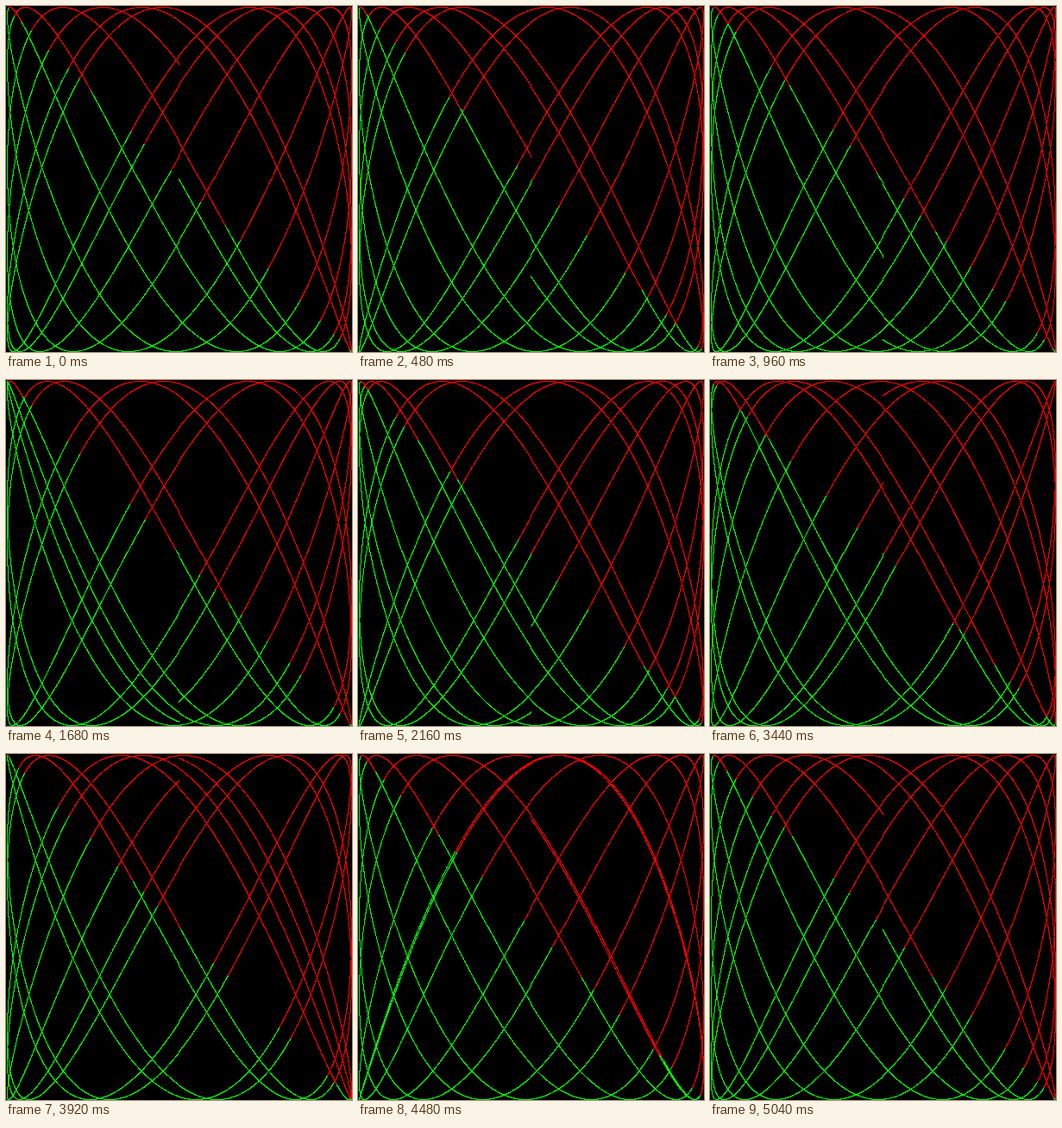
Recreate the animation shown at these times as an HTML page with a canvas. Size 401 px wide and 401 px high, loop 5120 ms.

```html
<!DOCTYPE html>
<html lang="en">
<head>
<meta charset="utf-8">
<title>Lissajous</title>
<style>
  html, body { margin: 0; width: 100%; height: 100%; overflow: hidden; background: #000; }
  canvas { display: block; width: 401px; height: 401px; image-rendering: pixelated; }
</style>
</head>
<body>
<canvas id="stage" width="401" height="401"></canvas>
<script>
const RADIUS = 200;
const SIZE = 2 * RADIUS + 1;
const CYCLES = 6;
const STEP = 0.001;
const FREQ = 1.8139808639388588;
const POSES = 64;
const POSE_MS = 80;
const PHASE_STEP = 0.1;

// Pixels as little-endian ABGR
const BLACK = 0xff000000;
const RED = 0xff0000ff;
const GREEN = 0xff00ff00;

const ctx = document.getElementById("stage").getContext("2d");
const image = ctx.createImageData(SIZE, SIZE);
const pixels = new Uint32Array(image.data.buffer);

// Rounding toward zero keeps the curve off the first row and column
const toPixel = v => RADIUS + Math.trunc(v * RADIUS + 0.5);

function drawPose(phase) {
  pixels.fill(BLACK);
  for (let t = 0; t < CYCLES * 2 * Math.PI; t += STEP) {
    const x = Math.sin(t);
    const y = Math.sin(t * FREQ + phase);
    pixels[toPixel(y) * SIZE + toPixel(x)] = x > y ? RED : GREEN;
  }
  ctx.putImageData(image, 0, 0);
}

const start = performance.now();
let shown = -1;

function tick() {
  const elapsed = Math.max(0, performance.now() - start);
  const pose = Math.floor(elapsed / POSE_MS) % POSES;
  if (pose !== shown) {
    drawPose(pose * PHASE_STEP);
    shown = pose;
  }
  requestAnimationFrame(tick);
}

tick();
</script>
</body>
</html>
```
